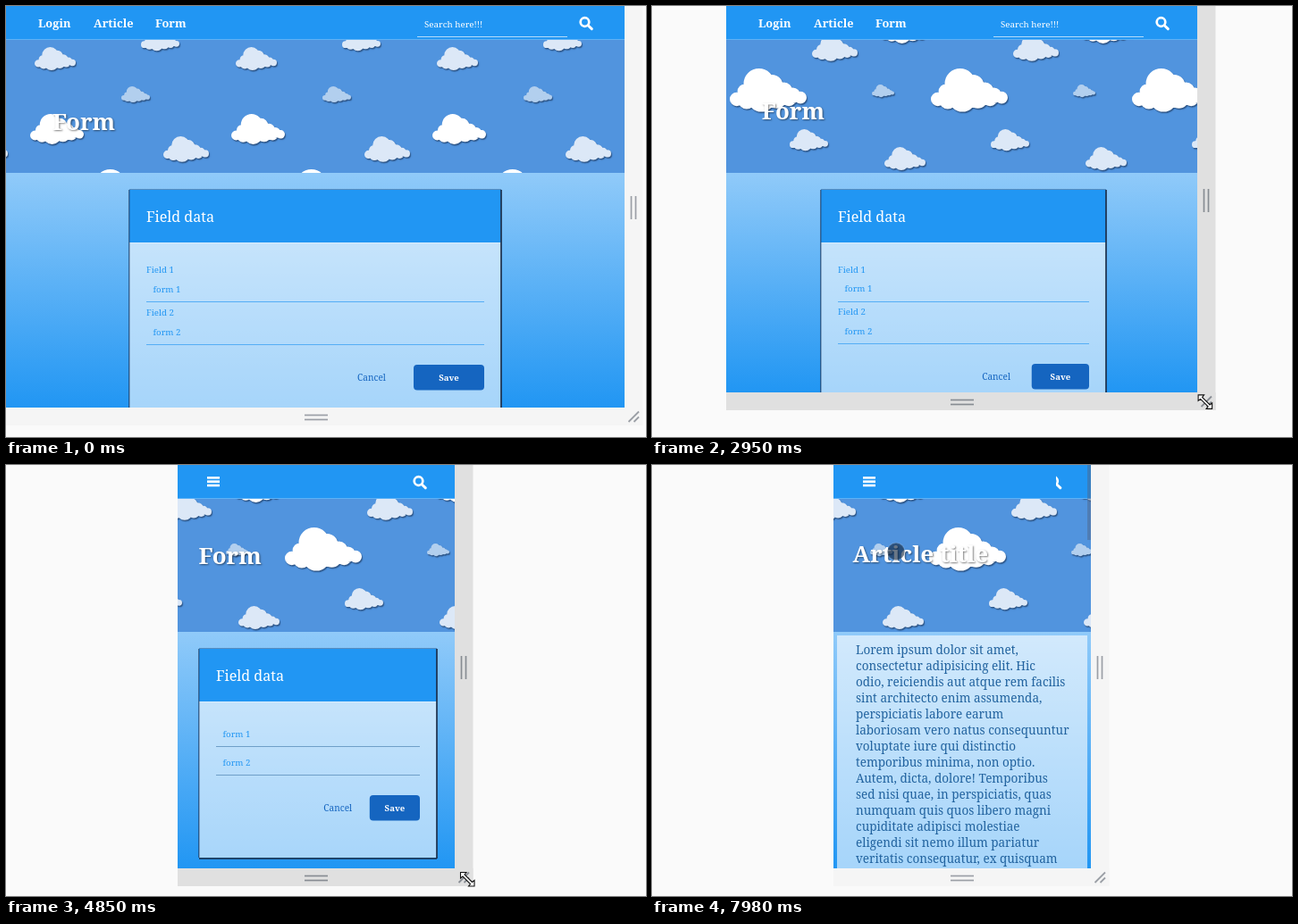
These frames come from a looping animation (716x483 px, 8000 ms). An HTML page with a canvas:

```html
<!DOCTYPE html>
<html lang="en">
<head>
<meta charset="utf-8">
<title>Responsive form</title>
<style>
html, body { margin: 0; width: 100%; height: 100%; overflow: hidden; background: #fafafa; }
canvas { display: block; }
</style>
</head>
<body>
<canvas id="stage" width="716" height="483"></canvas>
<script>
const ctx = document.getElementById('stage').getContext('2d');
const LOOP = 8000;
const BLUE = '#2196f3', DEEP = '#1565c0';
const TILE = 225;
const DRAG = [1850, 5330];
const ARTICLE_AT = 7200;

// Time tracks: [ms, value, ...]
const LEFT = [[1850, 0], [2550, 50], [2650, 64], [3550, 122], [4050, 173], [4450, 181], [5280, 203]];
const BOTTOM = [[1850, 450], [2550, 434], [2650, 433], [3550, 433], [4050, 451], [4450, 452]];
const GRIP = [[1850, 6, 3], [2550, -1, 2], [3550, 3, 3], [4050, 6, 4], [5300, 6, 4]];
const POINTER_IN = [[60, 470, 500], [350, 520, 440], [880, 674, 403], [1200, 684, 420], [1750, 706, 461]];
const POINTER_OUT = [[5330, 500, 461], [5420, 480, 430], [5760, 194, 110], [5940, 211, 16],
  [6140, 240, 20], [6420, 243, 20], [6850, 273, 97]];

const ARTICLE = [
  'Lorem ipsum dolor sit amet,', 'consectetur adipisicing elit. Hic',
  'odio, reiciendis aut atque rem facilis', 'sint architecto enim assumenda,',
  'perspiciatis labore earum', 'laboriosam vero natus consequuntur',
  'voluptate iure qui distinctio', 'temporibus minima, non optio.',
  'Autem, dicta, dolore! Temporibus', 'sed nisi quae, in perspiciatis, quas',
  'numquam quis quos libero magni', 'cupiditate adipisci molestiae',
  'eligendi sit nemo illum pariatur', 'veritatis consequatur, ex quisquam'
];

const clamp = v => Math.max(0, Math.min(1, v));

function track(keys, t) {
  if (t <= keys[0][0]) return keys[0].slice(1);
  for (let i = 1; i < keys.length; i++) {
    const a = keys[i - 1], b = keys[i];
    if (t <= b[0]) {
      const k = (t - a[0]) / (b[0] - a[0]);
      return a.slice(1).map((v, j) => v + (b[j + 1] - v) * k);
    }
  }
  return keys[keys.length - 1].slice(1);
}

function rect(x, y, w, h, color) {
  ctx.fillStyle = color;
  ctx.fillRect(x, y, w, h);
}

function text(s, x, y, size, color, weight = 400, align = 'left') {
  ctx.font = `${weight} ${size}px "Noto Serif", serif`;
  ctx.textAlign = align;
  ctx.fillStyle = color;
  ctx.fillText(s, x, y);
}

function line(x1, y1, x2, y2, color, width) {
  ctx.strokeStyle = color;
  ctx.lineWidth = width;
  ctx.beginPath();
  ctx.moveTo(x1, y1);
  ctx.lineTo(x2, y2);
  ctx.stroke();
}

// Cloud puffs as [x, y, radius], relative to the cloud width
const PUFFS = [[.09, .4, .09], [.2, .3, .1], [.38, .2, .2], [.55, .22, .14], [.7, .3, .12],
  [.82, .35, .1], [.92, .38, .08], [.22, .42, .11], [.41, .39, .175], [.61, .39, .13], [.77, .39, .1]];

function cloud(g, x, y, w, color) {
  g.fillStyle = color;
  g.beginPath();
  for (const [px, py, r] of PUFFS) {
    g.moveTo(x + (px + r) * w, y + py * w);
    g.arc(x + px * w, y + py * w, r * w, 0, 7);
  }
  g.fill();
}

function makeSky() {
  const tile = document.createElement('canvas');
  tile.width = tile.height = TILE;
  const g = tile.getContext('2d');
  g.fillStyle = '#5194de';
  g.fillRect(0, 0, TILE, TILE);
  g.shadowColor = '#2c5486';
  g.shadowOffsetX = 1;
  g.shadowOffsetY = 1.5;
  g.shadowBlur = 1.2;
  const near = '#fff', mid = '#dce8f7', far = '#b2cfee';
  const clouds = [[0, 70, 86, near], [92, 33, 51, mid], [168, 8, 60, near], [173, 158, 46, mid],
    [67, 138, 43, mid], [159, 88, 25, far], [45, 202, 32, far]];
  for (const [x, y, w, color] of clouds)
    for (const dx of [-TILE, 0])
      for (const dy of [-TILE, 0]) cloud(g, x + dx, y + dy, w, color);
  return ctx.createPattern(tile, 'repeat');
}
const sky = makeSky();

function searchIcon(cx) {
  ctx.lineCap = 'round';
  ctx.strokeStyle = '#fff';
  ctx.lineWidth = 2.7;
  ctx.beginPath();
  ctx.arc(cx - 1.5, 18, 4.8, 0, 7);
  ctx.stroke();
  line(cx + 2.5, 22, cx + 6.3, 25.6, '#fff', 3);
  ctx.lineCap = 'butt';
}

function navBar(p, t) {
  rect(p.x, 0, p.w, 38, BLUE);
  rect(p.x, 37, p.w, 1, '#5fb2f6');
  const right = p.x + p.lw;
  if (p.wide) {
    text('Login', p.x + 36, 24, 12.8, '#fff', 700);
    text('Article', p.x + 98, 24, 12.8, '#fff', 700);
    text('Form', p.x + 167, 24, 12.8, '#fff', 700);
    text('Search here!!!', right - 224, 24, 9.8, '#fff', 500);
    rect(right - 232, 34, 168, 1, '#b5dcfb');
  } else {
    for (let i = 0; i < 3; i++) rect(p.x + 33, 13 + i * 4.3, 14, 2.6, '#fff');
  }
  const cx = right - (p.w < 300 ? 40.5 : 43);
  if (t < ARTICLE_AT) searchIcon(cx);
  else if (t >= 7930) {
    ctx.save();
    ctx.beginPath();
    ctx.rect(cx + 1.5, 10, 20, 20);
    ctx.clip();
    searchIcon(cx);
    ctx.restore();
  }
}

function hero(p, title) {
  const ox = Math.round(p.x + p.lw / 2 - 37), oy = p.w > 645 ? 113 : 0;
  ctx.save();
  ctx.translate(ox, oy);
  ctx.fillStyle = sky;
  ctx.fillRect(p.x - ox, 38 - oy, p.w, 149);
  ctx.restore();
  ctx.save();
  ctx.shadowColor = 'rgba(0,0,0,.5)';
  ctx.shadowOffsetX = 1;
  ctx.shadowOffsetY = 1.5;
  ctx.shadowBlur = 2;
  text(title, p.x + p.lw * .075, 87.3 + p.lw * .0747, 26, '#fff', 600);
  ctx.restore();
}

function body(p) {
  const g = ctx.createLinearGradient(0, 187, 0, p.h);
  g.addColorStop(0, '#90caf9');
  g.addColorStop(1, BLUE);
  rect(p.x, 187, p.w, p.h - 187, g);
}

function formCard(p) {
  const margin = p.wide ? .2 : .075;
  const l = Math.round(p.x + p.lw * margin), r = Math.round(p.x + p.lw * (1 - margin));
  const labels = p.w > 320;
  const row = labels ? 48 - (692 - p.w) * .003 : 32;
  const first = labels ? 283 + row : 315;
  const second = first + row;
  const top = Math.round(second + 23);
  const end = top + 70;
  const a = l + 19, b = r - 19;

  rect(l, 206, r - l, 59, BLUE);
  rect(l, 265, r - l, end - 265, 'rgba(255,255,255,.6)');
  rect(l, 265, r - l, 1, 'rgba(255,255,255,.3)');
  rect(l, 205, r - l, 1, 'rgba(30,70,120,.45)');
  rect(l - 1, 206, 1.5, end - 206, 'rgba(25,55,95,.65)');
  rect(r - 1, 206, 2, end - 205, 'rgba(28,48,76,.85)');
  rect(l, end, r - l, 2, 'rgba(28,48,76,.8)');
  text('Field data', a, 242, 16.1, '#fff', 500);

  [first, second].forEach((y, i) => {
    if (labels) text(`Field ${i + 1}`, a, y - 32, 9.7, BLUE);
    text(`form ${i + 1}`, a + 7.5, y - 10.5, 9.7, BLUE);
    rect(a, Math.round(y), b - a, 1, labels ? '#55aef5' : '#6f9fc8');
  });

  const span = b - a;
  const bw = 53 + .152 * (span - 207);
  ctx.fillStyle = DEEP;
  ctx.beginPath();
  ctx.roundRect(b - bw, top, bw, 28.5, 4);
  ctx.fill();
  text('Save', b - bw / 2, top + 18, 9.6, '#fff', 700, 'center');
  text('Cancel', b - bw - .076 * span - 2.3, top + 18, 10.1, DEEP, 400, 'right');
}

function articleCard(p) {
  rect(p.x + 4, 191, p.w - 8, p.h - 191, 'rgba(255,255,255,.6)');
  ARTICLE.forEach((s, i) => text(s, p.x + 25, 212 + i * 18, 13.5, '#22639f'));
  rect(p.x + p.w - 4, 0, 4, 84, 'rgba(80,105,140,.5)');
}

function menu(p, t) {
  const k = clamp((t - 6420) / 200);
  if (!k || t >= ARTICLE_AT) return;
  ctx.save();
  ctx.beginPath();
  ctx.rect(p.x, 38, 231, 112 * k);
  ctx.clip();
  rect(p.x, 38, 231, 112, BLUE);
  ['Login', 'Article', 'Form'].forEach((s, i) =>
    text(s, p.x + 36, 61 + i * 37, 12.8, '#fff', 700));
  ctx.restore();
}

function handle(x, y, vertical, color) {
  for (const d of [-2.5, 2.5]) {
    if (vertical) line(x + d, y - 13, x + d, y + 13, color, 1.7);
    else line(x - 13, y + d, x + 13, y + d, color, 1.7);
  }
}

function frame(p, t, dragging) {
  const bar = dragging ? '#e0e0e0' : '#f5f5f5';
  const ink = dragging ? '#878c93' : '#9b9fa6';
  const right = p.x + p.w;
  rect(p.x, p.h, p.w + 20.5, 20, bar);
  rect(right, 0, 20.5, p.h + 20, bar);
  handle(347, p.h + 11, false, ink);
  handle(right + 10, Math.round(p.h / 2) + 1, true, t > 1500 && t < 5400 ? '#878c93' : ink);
  line(right + 4.5, p.h + 16, right + 16, p.h + 4.5, ink, 1.8);
  line(right + 10.5, p.h + 16, right + 16, p.h + 10.5, ink, 1.8);

  const side = clamp((t - 5700) / 60) * (1 - clamp((t - 5960) / 100));
  if (side) {
    ctx.globalAlpha = side;
    rect(p.x - 20, 0, 20, p.h, '#ebebeb');
    handle(p.x - 10, 227, true, '#a3a6ab');
    ctx.globalAlpha = 1;
  }
}

function shape(points, x, y) {
  ctx.beginPath();
  points.forEach(([px, py]) => ctx.lineTo(x + px, y + py));
  ctx.closePath();
  ctx.fillStyle = '#fff';
  ctx.strokeStyle = '#111';
  ctx.lineWidth = 1.1;
  ctx.fill();
  ctx.stroke();
}

const ARROW = [[0, 0], [0, 14], [3.4, 11], [6, 16], [8, 15], [5.7, 10.2], [10, 10]];
const RESIZE = [[.5, .5], [7, .5], [5, 3], [13.5, 11.5], [16, 9.5],
  [16, 16], [9.5, 16], [11.5, 13.5], [3, 5], [.5, 7]];

function pointer(p, t, dragging) {
  if (dragging) {
    const [dx, dy] = track(GRIP, t);
    shape(RESIZE, p.x + p.w + dx, p.h + dy);
    return;
  }
  if (t < 60) return;
  const [x, y] = track(t < DRAG[0] ? POINTER_IN : POINTER_OUT, t);
  if (x < p.x || x > p.x + p.w || y > p.h) {
    shape(ARROW, x, y);
    return;
  }
  ctx.beginPath();
  ctx.arc(x, y, 9.7, 0, 7);
  ctx.fillStyle = 'rgba(15,35,60,.62)';
  ctx.fill();
  ctx.strokeStyle = `rgba(255,255,255,${t > 6850 ? .12 : .5})`;
  ctx.lineWidth = 1.8;
  ctx.stroke();
}

function draw(t) {
  const dragging = t >= DRAG[0] && t < DRAG[1];
  const x = Math.round(track(LEFT, t)[0]);
  const right = Math.round(692 + 2 * clamp(x / 120)) - x;
  const w = right - x;
  // Layout trails the dragged edge slightly
  const lag = dragging ? 4 * clamp((t - 1850) / 150) * clamp((5330 - t) / 150) : 0;
  const p = { x, w, h: Math.round(track(BOTTOM, t)[0]), lw: w + lag, wide: w > 520 };
  const article = t >= ARTICLE_AT;

  rect(0, 0, 716, 483, '#fafafa');
  frame(p, t, dragging);
  ctx.save();
  ctx.beginPath();
  ctx.rect(p.x, 0, p.w, p.h);
  ctx.clip();
  body(p);
  hero(p, article ? 'Article title' : 'Form');
  navBar(p, t);
  if (article) articleCard(p);
  else formCard(p);
  menu(p, t);
  ctx.restore();
  pointer(p, t, dragging);
}

const start = performance.now();
function tick() {
  draw((performance.now() - start) % LOOP);
  requestAnimationFrame(tick);
}
tick();
</script>
</body>
</html>
```
